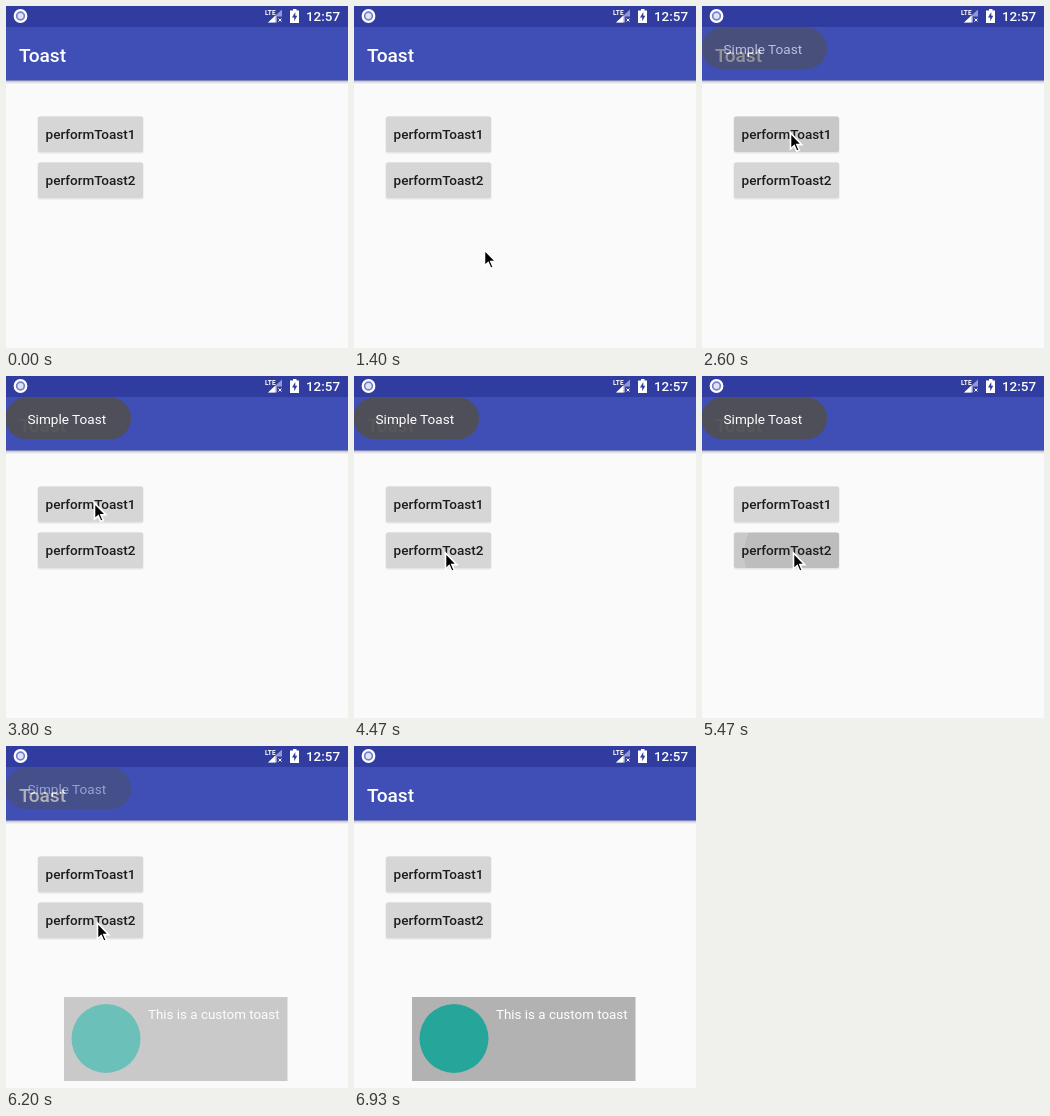
Recreate the animation shown at these times as an HTML page. Size 342 by 342 pixels, loop 8 s.

```html
<!DOCTYPE html>
<html lang="en">
<head>
<meta charset="utf-8">
<title>Toast</title>
<style>
  html, body { margin: 0; height: 100%; overflow: hidden; background: #fafafa; }
  svg { display: block; width: 100vw; height: 100vh; font-family: Roboto, sans-serif; }
  .medium { font-weight: 500; }
  .label { font-size: 13.55px; fill: #1c1c1c; }
</style>
</head>
<body>
<svg viewBox="0 0 342 342">
  <defs>
    <linearGradient id="shade" x2="0" y2="1">
      <stop stop-color="#b4b4b8"/>
      <stop offset="1" stop-color="#fafafa"/>
    </linearGradient>
    <clipPath id="clip1"><rect x="32" y="110.5" width="105" height="35.5" rx="2"/></clipPath>
    <clipPath id="clip2"><rect x="32" y="156.5" width="105" height="35.5" rx="2"/></clipPath>
  </defs>

  <rect width="342" height="342" fill="#fafafa"/>
  <rect y="74" width="342" height="4" fill="url(#shade)"/>
  <rect width="342" height="74.5" fill="#3f4fb5"/>
  <rect width="342" height="21" fill="#303c9f"/>

  <g fill="#fff">
    <circle cx="14.5" cy="10" r="5.8" fill="#7480c9" stroke="#fff" stroke-width="2.2"/>
    <circle cx="14.5" cy="10" r="3" fill="#dfe3f7"/>
    <text x="259" y="8.5" font-size="6.5" font-weight="700">LTE</text>
    <path d="M262 16.500 276 3.500V10.500H271V16.500Z" fill="#8f98d0"/>
    <path d="M262 16.500 269.500 9.500V16.500Z"/>
    <path d="M272.500 12.500l3 3m0-3l-3 3" stroke="#fff"/>
    <path d="M284 4.500H287V3H290.500V4.500H293V17H284Z"/>
    <path d="M289.300 6 286 11.500H288.200V15.200L291.300 9.800H289.300Z" fill="#303c9f"/>
    <text class="medium" x="300" y="15" font-size="13.4">12:57</text>
    <text class="medium" x="13" y="55.5" font-size="19.1">Toast</text>
  </g>

  <g id="buttons"></g>

  <g id="simple">
    <rect x="-.5" y="21.5" width="125.5" height="41.5" rx="20.5" fill="#505054" fill-opacity=".95"/>
    <text x="21.5" y="48" font-size="13.6" letter-spacing="0" fill="#fff">Simple Toast</text>
  </g>

  <g id="custom">
    <rect x="58" y="251" width="223.5" height="84" fill="#b2b2b2"/>
    <circle cx="100" cy="292.5" r="34.5" fill="#26a69a"/>
    <text x="142" y="273" font-size="13.4" fill="#fff">This is a custom toast</text>
  </g>

  <path id="cursor" d="M0 0V16L3.700 12.600 6.200 18.300 8.800 17.200 6.400 11.600H11.300Z"
    stroke="#fff" stroke-width="1.6"/>
</svg>

<script>
const LOOP = 8000, FPS = 15;
const $ = id => document.getElementById(id);
const clamp = v => Math.min(1, Math.max(0, v));
const progress = (t, start, length) => clamp((t - start) / length);
const smooth = p => p * p * (3 - 2 * p);

const buttons = [
  { y: 110.5, press: 2130, tapX: 89, tapY: 128 },
  { y: 156.5, press: 5200, tapX: 92, tapY: 178 },
];
$('buttons').innerHTML = buttons.map(({ y, tapX, tapY }, i) => `
  <rect x="31.5" y="${y}" width="106" height="37" rx="2.5" fill="#e6e6e6"/>
  <rect x="32" y="${y}" width="105" height="35.5" rx="2" fill="#d6d6d6"/>
  <g id="ripple${i}" clip-path="url(#clip${i + 1})" fill-opacity=".06">
    <rect x="32" y="${y}" width="105" height="36"/>
    <circle cx="${tapX}" cy="${tapY}"/>
  </g>
  <text class="medium label" x="39.5" y="${y + 22.5}">performToast${i + 1}</text>`).join('');

// Pointer stops: time, x, y
const path = [
  [266, 147, 330], [470, 116, 228], [733, 131, 245], [1050, 131, 245],
  [1130, 130.5, 244], [1390, 130.5, 244], [2130, 88.5, 127],
  [3780, 88.5, 127], [4470, 91.5, 177], [LOOP, 91.5, 177],
];

function pointerAt(t) {
  const i = Math.max(1, path.findIndex(stop => t < stop[0]));
  const [t0, x0, y0] = path[i - 1], [t1, x1, y1] = path[i];
  const p = smooth(progress(t, t0, t1 - t0));
  return [x0 + (x1 - x0) * p, y0 + (y1 - y0) * p];
}

const fadeIn = (t, start, length) => 1 - (1 - progress(t, start, length)) ** 2;
const fadeOut = (t, start, length) => 1 - progress(t, start, length) ** 2;

function draw(now) {
  const t = Math.floor((now % LOOP) * FPS / 1000) * 1000 / FPS;

  buttons.forEach(({ press }, i) => {
    const ripple = $('ripple' + i);
    ripple.setAttribute('opacity', t < press ? 0 : 1 - progress(t, press + 300, 380));
    ripple.lastElementChild.setAttribute('r', 75 * progress(t, press, 400));
  });

  $('simple').setAttribute('opacity', fadeIn(t, 2440, 400) * fadeOut(t, 5905, 400));
  $('custom').setAttribute('opacity', fadeIn(t, 6000, 470));

  const cursor = $('cursor');
  cursor.setAttribute('transform', `translate(${pointerAt(t)})`);
  cursor.setAttribute('visibility', t > 266 && t < 6800 ? 'visible' : 'hidden');
  requestAnimationFrame(draw);
}
requestAnimationFrame(draw);
</script>
</body>
</html>
```
